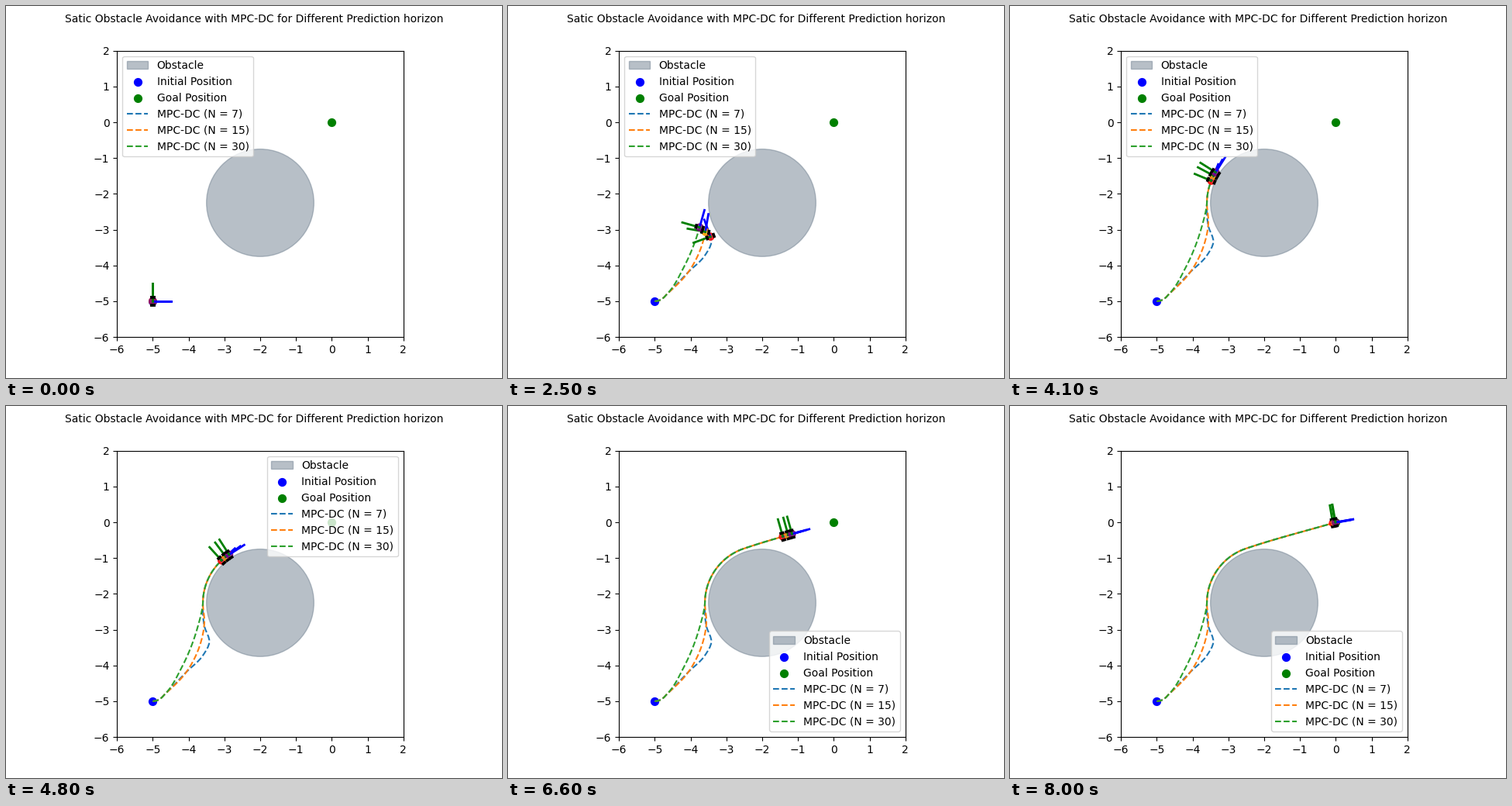
A matplotlib script that plays this animation: 640x480 px, repeating every 10000 ms.

```python
import numpy as np
import matplotlib.pyplot as plt
from matplotlib.animation import FuncAnimation

plt.rcParams["font.family"] = "DejaVu Sans"

FRAMES, INTERVAL, LAST_STEP = 100, 100, 80
STEP = 0.1                      # distance travelled per frame
BRAKING = 0.12                  # distance to the goal where robots slow down
OBSTACLE, RADIUS, CLEARANCE = np.array([-2, -2.25]), 1.5, 1.6
GOAL = np.array([0.0, 0.0])
START = [(-5, -5), (-4.85, -4.97), (-4.65, -4.79)]

# horizon, body colour, key points on the way to the obstacle
RUNS = [
    (7, "red", [(-4.06, -4.18), (-3.6, -3.72), (-3.42, -3.35), (-3.56, -2.9)]),
    (15, "orange", [(-4.06, -4.18), (-3.71, -3.51), (-3.56, -2.81)]),
    (30, "purple", [(-4.19, -4.05), (-3.75, -2.94)]),
]


def path_length(points):
    return np.r_[0, np.cumsum(np.hypot(*np.diff(points, axis=0).T))]


def smooth(points, samples=30):
    """Cubic Hermite curve through the points, by chord length."""
    chord = path_length(points)
    slope = np.gradient(points, chord, axis=0)
    t = np.linspace(0, 1, samples, endpoint=False)[:, None]
    parts = []
    for i, h in enumerate(np.diff(chord)):
        parts.append((1 + 2 * t) * (1 - t) ** 2 * points[i]
                     + t * (1 - t) ** 2 * h * slope[i]
                     + t * t * (3 - 2 * t) * points[i + 1]
                     + t * t * (t - 1) * h * slope[i + 1])
    return np.vstack(parts + [points[-1:]])


def plan(key_points):
    """Position and heading at every step: approach, arc, straight to the goal."""
    to_goal = GOAL - OBSTACLE
    leave = (np.arctan2(to_goal[1], to_goal[0])
             + np.arccos(CLEARANCE / np.hypot(*to_goal)))
    angles = np.linspace(np.pi, leave, 16)
    arc = OBSTACLE + CLEARANCE * np.c_[np.cos(angles), np.sin(angles)]
    curve = smooth(np.vstack([START, key_points, arc, GOAL]))

    length = path_length(curve)
    left = length[-1] - STEP * np.arange(LAST_STEP + 1)
    left = np.where(left < BRAKING, BRAKING * np.exp(np.minimum(left / BRAKING - 1, 0)), left)
    travelled = length[-1] - left
    x, y = (np.interp(travelled, length, axis) for axis in curve.T)

    dx, dy = np.diff(curve, axis=0).T
    heading = np.interp(travelled, (length[1:] + length[:-1]) / 2, np.arctan2(dy, dx))
    heading -= 0.11 * np.clip(1.3 - left / 0.3, 0, 1)
    heading[0] = 0
    return x, y, heading


class Robot:
    def __init__(self, ax, color, route, trail, z):
        self.route, self.trail = route, trail
        self.body = ax.add_patch(plt.Circle((0, 0), 0.1, color=color, alpha=0.8, zorder=z))
        self.parts = []

        def add(start, end, color, width):
            line, = ax.plot([], [], color=color, lw=width, zorder=z + 0.1)
            self.parts.append((line, np.array([start, end])))

        add((0, 0), (0.5, 0), "blue", 2)
        add((0, 0), (0, 0.5), "green", 2)
        for side in (0.1, -0.1):
            add((-0.03, side), (0.03, side), "black", 2.6)

    def move(self, k):
        x, y, heading = self.route
        cos, sin = np.cos(heading[k]), np.sin(heading[k])
        turn = np.array([[cos, sin], [-sin, cos]])
        self.trail.set_data(x[:k + 1], y[:k + 1])
        self.body.center = x[k], y[k]
        for line, ends in self.parts:
            line.set_data(*(ends @ turn + (x[k], y[k])).T)


fig, ax = plt.subplots(figsize=(6.4, 4.8), dpi=100)
fig.suptitle("Satic Obstacle Avoidance with MPC-DC for Different Prediction horizon",
             fontsize=10)
ax.set_aspect("equal")
ax.set(xlim=(-6, 2), ylim=(-6, 2), xticks=range(-6, 3), yticks=range(-6, 3))

ax.add_patch(plt.Circle(OBSTACLE, RADIUS, color="slategray", alpha=0.5, label="Obstacle"))
ax.scatter(*START[0], s=50, color="blue", label="Initial Position")
ax.scatter(*GOAL, s=50, color="green", label="Goal Position")
trails = [ax.plot([], [], "--", label=f"MPC-DC (N = {n})")[0] for n, _, _ in RUNS]
legend = ax.legend(loc="upper left")
robots = [Robot(ax, color, plan(key_points), trail, 3 + 0.3 * i)
          for i, ((_, color, key_points), trail) in enumerate(zip(RUNS, trails))]


def update(frame):
    k = min(frame, LAST_STEP)
    for robot in robots:
        robot.move(k)
    # the legend steps aside when a robot comes near
    legend.set_loc("upper left" if k < 42 else "upper right" if k < 55 else "lower right")
    return []


anim = FuncAnimation(fig, update, frames=FRAMES, interval=INTERVAL,
                     init_func=lambda: update(0), repeat=True, repeat_delay=0)
plt.show()
```
